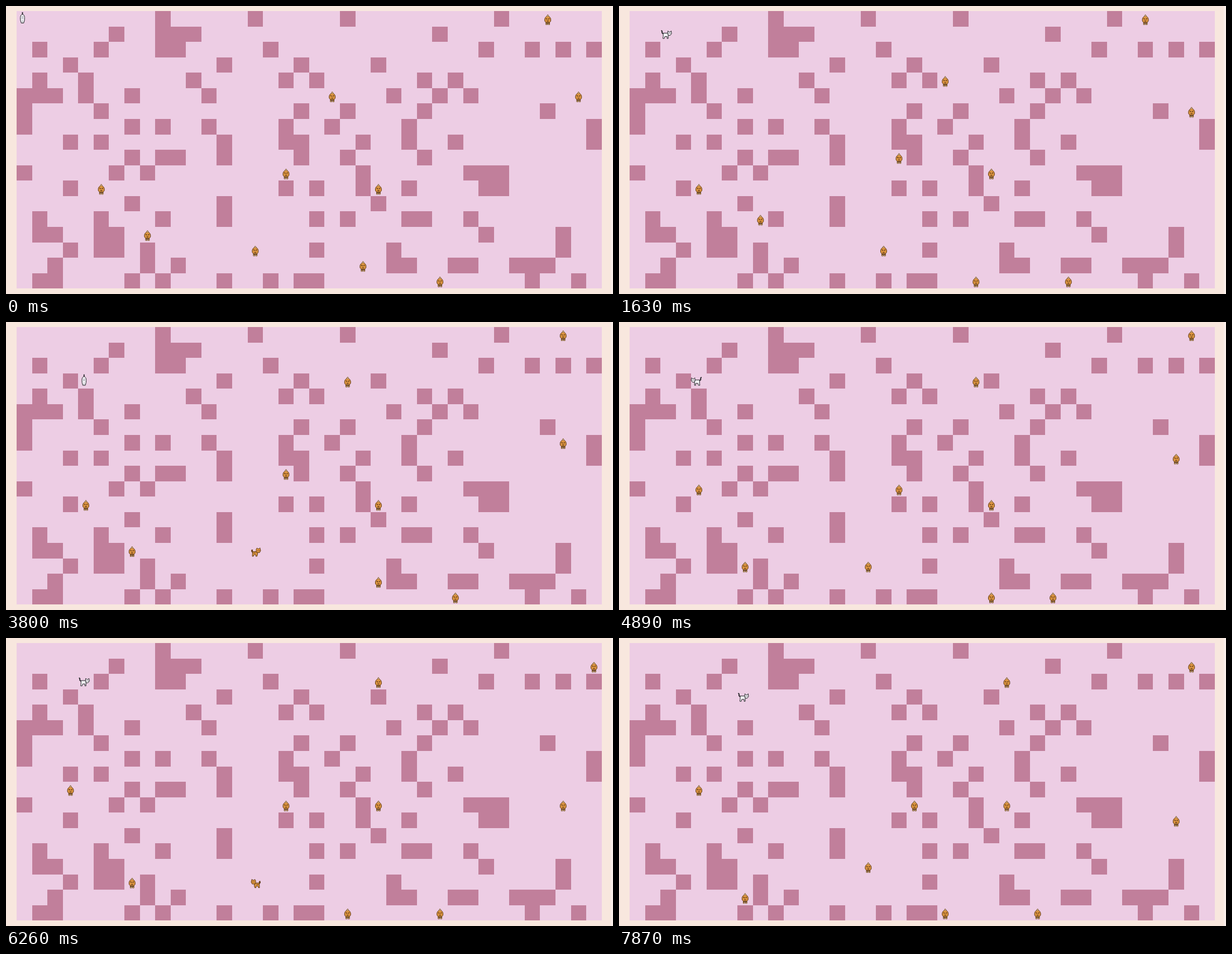
Recreate the animation shown at these times as an HTML page with a canvas. Size 1087 px wide and 515 px high, loop 8 s.

```html
<!DOCTYPE html>
<html lang="en">
<head>
<meta charset="utf-8">
<title>Cat in a maze</title>
<style>
html, body { margin: 0; width: 100%; height: 100%; overflow: hidden; background: #f8e7de; }
canvas { display: block; }
</style>
</head>
<body>
<canvas id="stage" width="1087" height="515"></canvas>
<script>
const ctx = document.getElementById('stage').getContext('2d');
const LOOP = 8000, CELL = 27.57, LEFT = 19, TOP = 9, COLS = 38, ROWS = 18;
const STEP = { U: [0, -1], D: [0, 1], L: [-1, 0], R: [1, 0], '.': [0, 0] };

// Wall columns, one string per row
const walls = [
  '9 15 21 31',
  '6 9 10 11 27',
  '1 5 9 10 16 30 33 35 37',
  '3 13 18 23',
  '1 4 11 17 19 26 28',
  '0 1 2 4 7 12 24 27 29',
  '0 5 18 21 26 34',
  '0 7 9 12 17 20 25 37',
  '3 5 13 17 18 22 25 28 37',
  '7 9 10 13 18 21 26',
  '0 6 8 22 29 30 31',
  '3 17 19 22 25 30 31',
  '7 13 23',
  '1 5 9 13 19 21 25 26 29',
  '1 2 5 6 30 35',
  '3 5 6 8 19 24 35',
  '2 8 10 24 25 28 29 32 33 34',
  '1 2 7 9 13 16 18 19 33 36'
].map(row => new Set(row.split(' ').map(Number)));

// Dogs take one step per second
const FIRST_TURN = 1150, TURN = 1000;
const dogs = [
  { col: 34, row: 0, route: 'LRRRRDL' },
  { col: 20, row: 5, route: 'URURURR' },
  { col: 36, row: 5, route: 'DDLDDDD' },
  { col: 5, row: 11, route: 'LDUULUR' },
  { col: 8, row: 14, route: 'UDLD..D' },
  { col: 17, row: 10, route: 'UDUDLRR' },
  { col: 23, row: 11, route: 'U.D..UR' },
  { col: 22, row: 16, route: 'DURDLLL' },
  { col: 27, row: 17, route: 'RRLLRLL' },
  { col: 15, row: 15, route: 'RLUDRLU', poses: 'DDRRDRLD' }
];

// The cat turns on every key press and moves if no wall is in the way
const keys = [
  [540, 'D'], [1000, 'R'], [1540, 'R'], [2300, 'R'], [2620, 'D'], [3150, 'R'], [3560, 'D'],
  [4450, 'L'], [5350, 'U'], [5900, 'R'], [6700, 'D'], [7000, 'R'], [7300, 'R'], [7700, 'R']
];

const part = (d, fill, stroke, width = 1) => ({ path: new Path2D(d), fill, stroke, width });
const INK = '#222226', BROWN = '#5e3b18', ORANGE = '#dc9440';

const catFront = [
  part('M10.5 2V7', null, INK, 1.8),
  part('M10.5 6C13 6 14.5 9 14.3 13L14 17L12.7 21.5H8.3L7 17L6.7 13C6.5 9 8 6 10.5 6Z', '#f4f4f8', INK),
  part('M8.5 10.5H12.5M8.5 13H12.5M9 19.5H12M10.5 16V17.5', null, '#85858f', .9)
];
const catSide = [
  part('M5.5 13.5L3 11.5V8.5L1.5 7', null, INK, 1.8),
  part('M5 12L13 12L14 16V21.5H12V18H8L7 21.5H4.5L5 18Z', '#f4f4f8', INK),
  part('M13 13L13.5 8L15.5 10H17.5L19.3 8L20 13L17.5 16H14.5Z', '#f4f4f8', INK),
  part('M15.4 12V13.5M18 12V13.5', null, INK, .9)
];
const dogFront = [
  part('M10.5 19V24.5H13V21H14.6V24.5H17.1V19Z', '#96713f', BROWN),
  part('M13.8 6.5L16 9.5L18 11.5L19.2 14V18L17 20.5H10.6L8.4 18V14L9.6 11.5L11.6 9.5Z', ORANGE, BROWN),
  part('M13.8 6.5L15.6 9.5H12Z', '#e2c9a3', '#94724c', .7),
  part('M10.5 13L13 15M17 13L14.6 15M12 18H15.6', null, BROWN, 1.3),
  part('M10.5 24H13M14.6 24H17.1', null, '#d9bd91', 1)
];
const dogSide = [
  part('M9.5 17L7.8 14.5L8.5 12', null, BROWN, 2.6),
  part('M9 15.5H18V20L17 24H14.8V21H11.5L10.5 24H8.5Z', ORANGE, BROWN),
  part('M15.5 17V11.5L17 9L18.5 10.5H20.5L22.2 8.8L23.5 14L21.5 17.5Z', ORANGE, BROWN),
  part('M18.5 13V14.4M21.3 13V14.4M10 18H14', null, BROWN, 1)
];

function drawSprite(front, side, col, row, pose, center) {
  ctx.save();
  ctx.translate(LEFT + col * CELL, TOP + row * CELL);
  if (pose === 'L') { ctx.translate(center * 2, 0); ctx.scale(-1, 1); }
  if (pose === 'U') { ctx.translate(0, 27); ctx.scale(1, -1); }
  for (const p of 'LR'.includes(pose) ? side : front) {
    if (p.fill) { ctx.fillStyle = p.fill; ctx.fill(p.path); }
    ctx.strokeStyle = p.stroke;
    ctx.lineWidth = p.width;
    ctx.stroke(p.path);
  }
  ctx.restore();
}

function fillCells(col, row, cols, rows, color) {
  const x = Math.round(LEFT + col * CELL), y = Math.round(TOP + row * CELL);
  ctx.fillStyle = color;
  ctx.fillRect(x, y, Math.round(LEFT + (col + cols) * CELL) - x, Math.round(TOP + (row + rows) * CELL) - y);
}

function drawBoard() {
  ctx.fillStyle = '#f8e7de';
  ctx.fillRect(0, 0, 1087, 515);
  ctx.fillStyle = '#faeee8';
  ctx.fillRect(1083, 0, 4, 515);
  fillCells(0, 0, COLS, ROWS, '#edcde4');
  walls.forEach((cols, row) => cols.forEach(col => fillCells(col, row, 1, 1, '#c17f9b')));
}

function drawDog({ col, row, route, poses }, turns) {
  for (const move of route.slice(0, turns)) {
    col += STEP[move][0];
    row += STEP[move][1];
  }
  drawSprite(dogFront, dogSide, col, row, poses ? poses[turns] : 'D', 15);
}

function drawCat(time) {
  let col = 0, row = 0, pose = 'D';
  for (const [at, key] of keys) {
    if (at > time) break;
    const [dx, dy] = STEP[key];
    pose = key;
    if (!walls[row + dy].has(col + dx)) { col += dx; row += dy; }
  }
  drawSprite(catFront, catSide, col, row, pose, 10);
}

const start = performance.now();
function frame() {
  const time = (performance.now() - start) % LOOP;
  const turns = Math.max(0, Math.floor((time - FIRST_TURN) / TURN) + 1);
  drawBoard();
  dogs.forEach(dog => drawDog(dog, turns));
  drawCat(time);
  requestAnimationFrame(frame);
}
frame();
</script>
</body>
</html>
```
